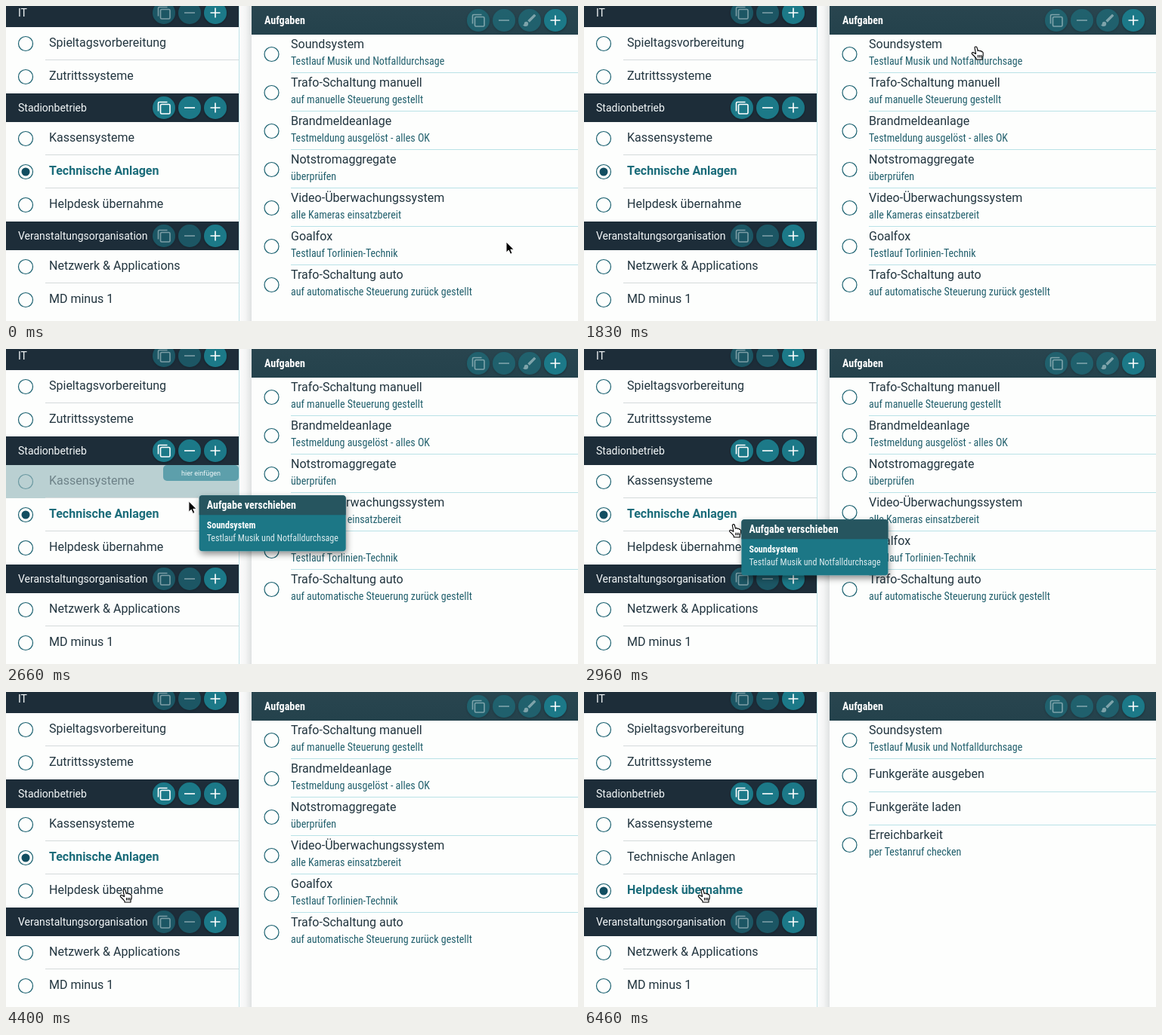
An HTML page that plays this animation: 757x418 px, repeating every 8000 ms.

```html
<!DOCTYPE html>
<html lang="de">
<head>
<meta charset="utf-8">
<title>Aufgabe verschieben</title>
<style>
  html, body { margin: 0; width: 100%; height: 100%; overflow: hidden; background: #fdfefd; }
  svg { display: block; width: 757px; height: 418px; }
  text { font: 16px Roboto, sans-serif; fill: #22353f; white-space: pre; }
  .head { font-size: 14px; fill: #f4f8f9; }
  .cond { font: 14px "Roboto Condensed", Roboto, sans-serif; font-stretch: 75%; fill: #22606d; }
  .narrow .cond { letter-spacing: -.052em; }
  .bold { font-weight: 700; }
  .small { font-size: 12px; }
  .white { fill: #fff; }
  .tag { font-size: 9px; fill: #f0f7f8; text-anchor: middle; }
  .radio { fill: none; stroke: #1c6271; stroke-width: 1.2; }
  .dot { fill: #124e61; }
  .selected .label { font-weight: 700; fill: #1b6c7a; }
  .item:not(.selected) .dot, .item:not(.over) .drop { display: none; }
  .over .face { opacity: .5; }
  .icon { fill: none; stroke: #fff; stroke-width: 1.6; }
  .off .disc { opacity: .55; }
  .off .icon { opacity: .42; }
</style>
</head>
<body>
<svg id="stage" viewBox="0 0 757 418">
  <defs>
    <linearGradient id="edge">
      <stop offset="0" stop-color="#fcfcfc"/>
      <stop offset=".5" stop-color="#f4f5f5"/>
      <stop offset="1" stop-color="#dfe2e2"/>
    </linearGradient>
    <linearGradient id="bar" x2="0" y2="1">
      <stop offset="0" stop-color="#29454f"/>
      <stop offset="1" stop-color="#24424c"/>
    </linearGradient>
    <filter id="soft" x="-30%" y="-30%" width="160%" height="170%">
      <feDropShadow dx="0" dy="1" stdDeviation="1.5" flood-opacity=".35"/>
    </filter>
    <filter id="lift" x="-20%" y="-30%" width="140%" height="180%">
      <feDropShadow dx="1" dy="4" stdDeviation="4.5" flood-opacity=".45"/>
    </filter>
  </defs>
  <g id="left"></g>
  <rect x="308" width="1" height="418" fill="#bfe3e8"/>
  <rect x="309" width="16" height="418" fill="url(#edge)"/>
  <rect x="325" width="432" height="418" fill="#fdfefd"/>
  <g id="right"></g>
  <g id="ghost">
    <g filter="url(#lift)">
      <rect width="194" height="74" rx="4" fill="#1b7786"/>
      <path d="M0 26V4Q0 0 4 0H190Q194 0 194 4V26Z" fill="#28545f"/>
    </g>
    <text class="cond bold white" x="10" y="18">Aufgabe verschieben</text>
    <text class="cond bold small white" x="10" y="44">Soundsystem</text>
    <text class="cond small" x="10" y="61" style="fill:#dcebee">Testlauf Musik und Notfalldurchsage</text>
  </g>
  <path id="arrow" d="M0 0V14.2L3.3 11.1 5.6 16.3 8 15.2 5.8 10.2H10.2Z"
        fill="#000" stroke="#fff" stroke-width="1"/>
  <g id="hand" stroke="#000" stroke-width="1.1" stroke-linejoin="round">
    <path fill="#fff" d="M-1.9 1.6C-2.4-.2 .4-.7 1 1L2.2 5.6C2.7 4.6 4.6 4.7 5 6 5.6 5.2 7 5.5 7.3 6.8 8.2 6.3 9 7 9.2 8.2 9.6 11 9 13 8 14.5V17H0V15.4C-1.5 13.5-3.5 11.5-5.2 10-6.6 8.6-5.2 7.2-3.6 7.8L-.4 9.6Z"/>
    <path fill="none" d="M2.5 11v3.5M4.6 11v3.5M6.7 11v3.5"/>
  </g>
</svg>
<script>
const LOOP = 8000;
const $ = id => document.getElementById(id);

const ICONS = {
  copy: '<rect x="-4.5" y="-4.5" width="12.5" height="12.5" rx="1.5"/><path d="M-7.5 4.5V-6Q-7.5-7.5-6-7.5H4.5"/>',
  minus: '<path d="M-7 0H7"/>',
  plus: '<path d="M-6.5 0H6.5M0-6.5V6.5"/>',
  brush: '<path transform="scale(.9) translate(-12-12)" fill="#fff" stroke="none" d="M7 14a3 3 0 0 0-3 3c0 1.3-1.2 2-2 2 .9 1.2 2.5 2 4 2a4 4 0 0 0 4-4 3 3 0 0 0-3-3zM20.7 4.6l-1.3-1.3a1 1 0 0 0-1.4 0L9 12.2 11.8 15l8.9-9a1 1 0 0 0 0-1.4z"/>'
};

const text = (x, y, str, cls = '') => `<text x="${x}" y="${y}" class="${cls}">${str}</text>`;
const line = (x, y, w, color) => `<rect x="${x}" y="${y}" width="${w}" height="1" fill="${color}"/>`;
const radio = (x, y) => `<circle class="radio" cx="${x}" cy="${y}" r="9.5"/>`;
const button = (icon, x, y, on) => `<g transform="translate(${x} ${y})" class="${on ? '' : 'off'}">
  <circle class="disc" r="15" fill="#1a7988" filter="url(#soft)"/><g class="icon">${ICONS[icon]}</g></g>`;

function groupHeader(y, title, active) {
  return `<rect y="${y}" width="308" height="38" fill="#1d2d39"/>` + text(16, y + 24, title, 'head') +
    ['copy', 'minus', 'plus'].map((icon, i) => button(icon, 209 + 34 * i, y + 19, active || i === 2)).join('');
}

function groupItem(y, title, last) {
  return `<g class="item" data-title="${title}">
    <rect class="drop" y="${y}" width="308" height="44" fill="#bad0d2"/>
    <g class="face">${radio(26, y + 22)}<circle class="dot" cx="26" cy="${y + 22}" r="5.5"/>
      ${text(57, y + 26, title, 'label')}</g>
    ${last ? '' : line(52, y + 43, 256, '#d5dadb')}
    <g class="drop"><rect x="208" y="${y}" width="100" height="21" rx="5" fill="#5d9fab"/>
      ${text(258, y + 14, 'hier einfügen', 'tag')}</g></g>`;
}

const GROUPS = [
  ['IT', false, ['Spieltagsvorbereitung', 'Zutrittssysteme']],
  ['Stadionbetrieb', true, ['Kassensysteme', 'Technische Anlagen', 'Helpdesk übernahme']],
  ['Veranstaltungsorganisation', false, ['Netzwerk &amp; Applications', 'MD minus 1']]
];

function buildLeft() {
  let y = -10, out = '';
  for (const [title, active, items] of GROUPS) {
    out += groupHeader(y, title, active);
    y += 38;
    items.forEach((name, i) => {
      out += groupItem(y, name, i === items.length - 1);
      y += 44;
    });
  }
  return out;
}

const SOUND = ['Soundsystem', 'Testlauf Musik und Notfalldurchsage'];
const REST = [
  ['Trafo-Schaltung manuell', 'auf manuelle Steuerung gestellt'],
  ['Brandmeldeanlage', 'Testmeldung ausgelöst - alles OK'],
  ['Notstromaggregate', 'überprüfen'],
  ['Video-Überwachungssystem', 'alle Kameras einsatzbereit'],
  ['Goalfox', 'Testlauf Torlinien-Technik'],
  ['Trafo-Schaltung auto', 'auf automatische Steuerung zurück gestellt']
];
const HELPDESK = [SOUND, ['Funkgeräte ausgeben'], ['Funkgeräte laden'],
  ['Erreichbarkeit', 'per Testanruf checken']];

function taskList(id, tasks) {
  let y = 38;
  const rows = tasks.map(([title, note], i) => {
    const height = note ? 51 : 44;
    const row = radio(351.5, y + (note ? 26 : 22)) + text(377, y + (note ? 18 : 25), title) +
      (note ? text(377, y + 40, note, 'cond') : '') +
      (i < tasks.length - 1 ? line(377, y + height - 1, 380, '#b9e2e7') : '');
    y += height;
    return row;
  });
  return `<g id="${id}">${rows.join('')}</g>`;
}

$('left').innerHTML = buildLeft();
$('right').innerHTML =
  taskList('full', [SOUND, ...REST]) + taskList('rest', REST) + taskList('helpdesk', HELPDESK) +
  `<g id="slot"><rect x="377" y="38" width="121" height="16" rx="6" fill="#1a7988"/>
    ${text(382, 51, 'hier hin verschieben', 'cond white')}</g>
  <rect x="325" width="432" height="38" fill="url(#bar)"/>` +
  text(342, 24, 'Aufgaben', 'cond bold white') +
  ['copy', 'minus', 'brush', 'plus'].map((icon, i) => button(icon, 625 + 34 * i, 19, i === 3)).join('');

// Tighten the tracking when no condensed face is available.
const probe = document.querySelector('#full .cond');
const condensed = probe.getComputedTextLength();
probe.style.fontFamily = 'Roboto, sans-serif';
probe.style.fontStretch = '100%';
if (probe.getComputedTextLength() - condensed < 5) document.body.classList.add('narrow');
probe.removeAttribute('style');

// Pointer path: time, x, y
const PATH = [
  [0, 662, 313], [530, 662, 313], [1330, 519, 62], [1400, 519, 62], [1530, 519, 54],
  [1830, 519, 54], [2140, 388, 89], [2200, 360, 104], [2600, 255, 194], [2660, 242, 202],
  [3400, 157, 262], [LOOP, 157, 262]
];
const LAG = 60;

function slope(i, axis) {
  const a = PATH[i - 1], b = PATH[i], c = PATH[i + 1];
  if (!a || !c || (b[axis] - a[axis]) * (c[axis] - b[axis]) <= 0) return 0;
  return (c[axis] - a[axis]) / (c[0] - a[0]);
}

function pointer(t) {
  let i = 0;
  while (i < PATH.length - 2 && t >= PATH[i + 1][0]) i++;
  const a = PATH[i], b = PATH[i + 1], span = b[0] - a[0], u = (t - a[0]) / span;
  const s = u * u * (3 - 2 * u);
  return [1, 2].map(k => a[k] + (b[k] - a[k]) * s +
    span * (slope(i, k) * u * (1 - u) ** 2 - slope(i + 1, k) * u * u * (1 - u)));
}

const items = [...document.querySelectorAll('.item')];
const show = (id, on) => { $(id).style.display = on ? '' : 'none'; };
const place = (id, x, y) => $(id).setAttribute('transform', `translate(${x.toFixed(1)} ${y.toFixed(1)})`);

function handVisible(t, x, y) {
  if (t < 1830) return x < 555;
  if (x > 325) return true;
  return y > 204 && x < 204;
}

function draw(t) {
  const [x, y] = pointer(t);
  const dragging = t >= 1900 && t < 3830;
  const inList = dragging && x > 325;
  const hand = handVisible(t, x, y);

  show('full', t < 1900 || (t >= 3830 && t < 4400));
  show('rest', dragging || (t >= 4400 && t < 6400));
  show('helpdesk', t >= 6400);
  show('slot', inList);
  place('rest', 0, inList ? 16 : 0);

  let target = '';
  if (dragging && x < 308) {
    if (y > 154 && y < 203) target = 'Kassensysteme';
    else if (y > 243) target = 'Helpdesk übernahme';
  }
  const selected = t < 6100 ? 'Technische Anlagen' : 'Helpdesk übernahme';
  for (const item of items) {
    item.classList.toggle('over', item.dataset.title === target);
    item.classList.toggle('selected', item.dataset.title === selected);
  }

  show('ghost', dragging);
  const [gx, gy] = pointer(Math.max(0, t - LAG));
  place('ghost', gx + 1, gy);
  show('hand', hand);
  show('arrow', !hand);
  place(hand ? 'hand' : 'arrow', x, y);
}

const start = performance.now();
function tick() {
  draw((performance.now() - start) % LOOP);
  requestAnimationFrame(tick);
}
tick();
</script>
</body>
</html>
```
